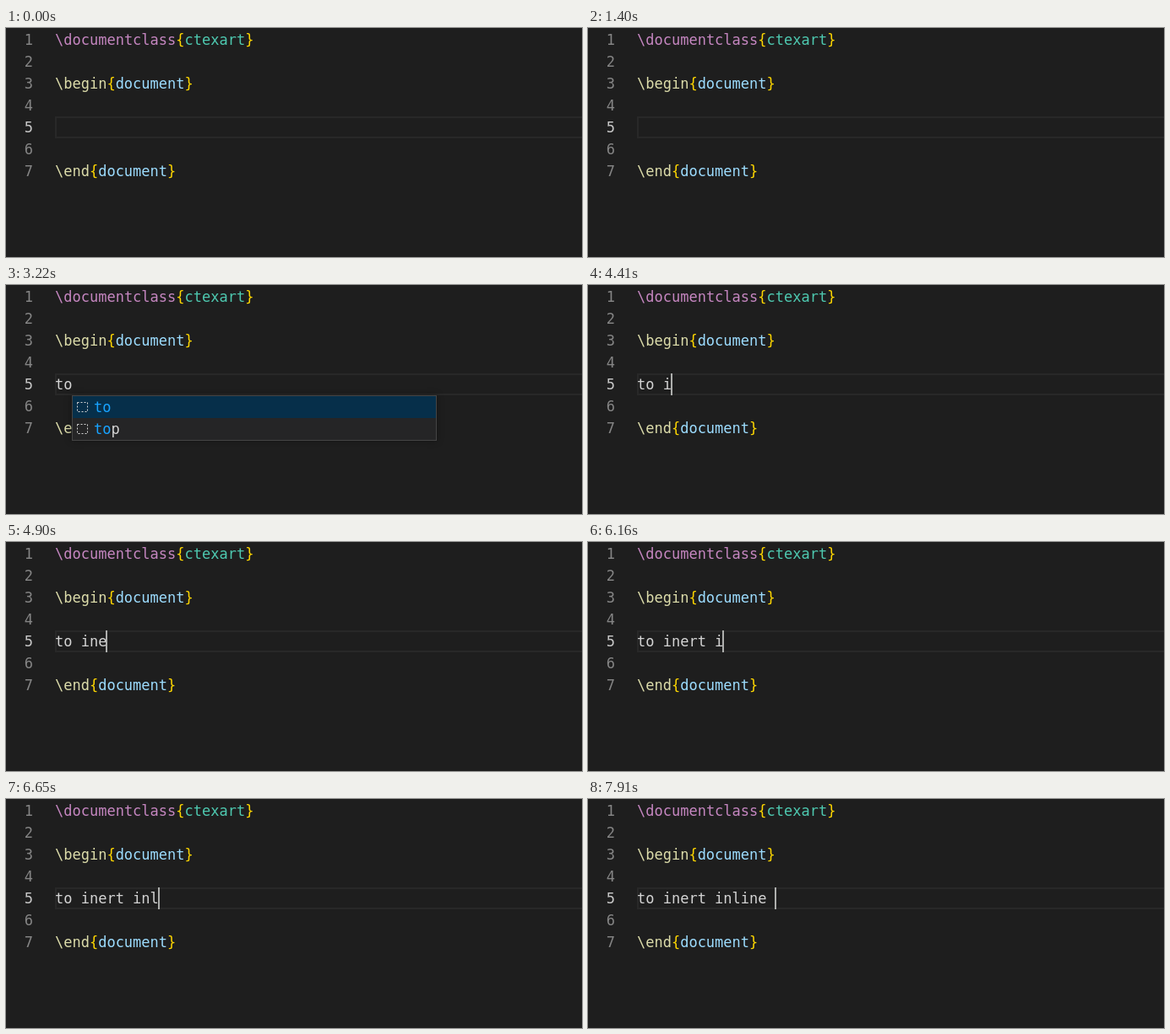
These frames come from a looping animation (682x272 px, 8000 ms). An HTML page with a canvas:

```html
<!DOCTYPE html>
<html lang="en">
<head>
<meta charset="utf-8">
<title>Typing in a LaTeX document</title>
<style>
  html, body { margin: 0; width: 100%; height: 100%; overflow: hidden; background: #1e1e1e; }
  canvas { display: block; width: 682px; height: 272px; }
</style>
</head>
<body>
<canvas id="stage"></canvas>
<script>
const W = 682, H = 272, LOOP = 8000;
const ROW = 26, TOP = 1, LEFT = 58, ADVANCE = 10.234, ACTIVE = 5;
const FONT = '17px "DejaVu Sans Mono", monospace';
const COLOR = {
  bg: '#1e1e1e', text: '#d4d4d4', number: '#858585', activeNumber: '#c6c6c6',
  keyword: '#c586c0', command: '#dcdcaa', brace: '#ffd700', type: '#4ec9b0',
  variable: '#9cdcfe', lineBorder: '#282828', cursor: '#aeafad',
  popup: '#252526', popupBorder: '#454545', selected: '#062f4a', match: '#18a3ff'
};

// Each line is a list of [text, colour] runs.
const call = (name, nameColor, arg, argColor) =>
  [[name, nameColor], ['{', 'brace'], [arg, argColor], ['}', 'brace']];
const LINES = {
  1: call('\\documentclass', 'keyword', 'ctexart', 'type'),
  3: call('\\begin', 'command', 'document', 'variable'),
  7: call('\\end', 'command', 'document', 'variable')
};

const TYPED = 'to inert inline ';
const KEYS = [2590, 2660, 3500, 4410, 4620, 4900, 5040, 5180,
              5530, 6090, 6300, 6650, 6930, 7630, 7700, 7910];
const CURSOR_OFF = [[0, 910], [1400, 1960], [2520, 2590], [3220, 3500],
                    [4060, 4410], [6020, 6090], [7420, 7630]];
const POPUPS = [
  { from: 2730, to: 3500, col: 2, match: 2, items: ['to', 'top'] },
  { from: 4690, to: 4900, col: 5, match: 2, items: ['in', 'int'] },
  { from: 6370, to: 6650, col: 11, match: 2, items: ['in', 'int', 'inert'] }
];

const canvas = document.getElementById('stage');
const ctx = canvas.getContext('2d');
const dpr = window.devicePixelRatio || 1;
canvas.width = W * dpr;
canvas.height = H * dpr;

const rowTop = line => TOP + (line - 1) * ROW;

function rect(x, y, w, h, color) {
  ctx.fillStyle = COLOR[color];
  ctx.fillRect(x, y, w, h);
}

function frame(x, y, w, h, color, size) {
  ctx.strokeStyle = COLOR[color];
  ctx.lineWidth = size;
  ctx.strokeRect(x + size / 2, y + size / 2, w - size, h - size);
}

// Draws runs inside a row whose top edge is y.
function drawRuns(runs, x, y) {
  for (const [text, color] of runs) {
    ctx.fillStyle = COLOR[color];
    ctx.fillText(text, x, y + 19);
    x += text.length * ADVANCE;
  }
}

function drawPopup({ col, match, items }) {
  const x = Math.round(LEFT + col * ADVANCE), y = rowTop(ACTIVE + 1);
  const w = 432, h = items.length * ROW + 2;
  ctx.save();
  ctx.shadowColor = 'rgba(0, 0, 0, 0.36)';
  ctx.shadowBlur = 8 * dpr;
  rect(x, y, w, h, 'popup');
  ctx.restore();
  rect(x + 1, y + 1, w - 2, ROW, 'selected');
  frame(x, y, w, h, 'popupBorder', 1);
  items.forEach((item, i) => {
    const top = y + 1 + i * ROW;
    ctx.strokeStyle = COLOR.text;
    ctx.lineWidth = 1;
    ctx.setLineDash([2, 2]);
    ctx.strokeRect(x + 6.5, top + 7.5, 12, 11);
    ctx.setLineDash([]);
    drawRuns([[item.slice(0, match), 'match'], [item.slice(match), 'text']], x + 26, top);
  });
}

function draw(t) {
  const during = ([from, to]) => t >= from && t < to;
  const count = KEYS.filter(key => key <= t).length;
  ctx.setTransform(dpr, 0, 0, dpr, 0, 0);
  ctx.font = FONT;
  ctx.textBaseline = 'alphabetic';
  rect(0, 0, W, H, 'bg');
  frame(LEFT, rowTop(ACTIVE), W - LEFT + 2, ROW, 'lineBorder', 2);

  for (let line = 1; line <= 7; line++) {
    const numberColor = line === ACTIVE ? 'activeNumber' : 'number';
    drawRuns([[String(line), numberColor]], 21.8, rowTop(line));
    drawRuns(LINES[line] || [], LEFT, rowTop(line));
  }
  drawRuns([[TYPED.slice(0, count), 'text']], LEFT, rowTop(ACTIVE));

  if (!CURSOR_OFF.some(during)) {
    const x = Math.max(LEFT, Math.floor(LEFT - 0.6 + count * ADVANCE));
    rect(x, rowTop(ACTIVE), 2, ROW, 'cursor');
  }
  const popup = POPUPS.find(p => during([p.from, p.to]));
  if (popup) drawPopup(popup);
}

let start;
function tick(now) {
  start ??= now;
  draw((now - start) % LOOP);
  requestAnimationFrame(tick);
}
draw(0);
requestAnimationFrame(tick);
</script>
</body>
</html>
```
